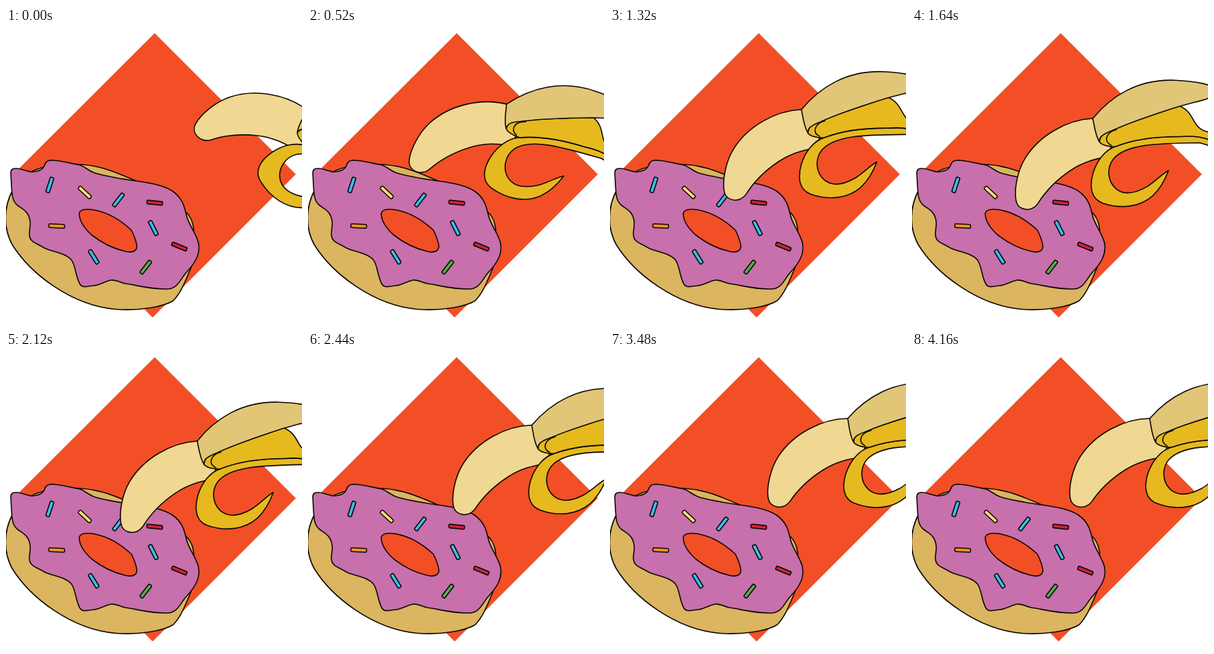
Recreate the animation shown at these times as an HTML page. Size 432 by 432 pixels, loop 4200 ms.

```html
<!DOCTYPE html>
<html lang="en">
<head>
<meta charset="utf-8">
<title>Banana and donut</title>
<style>
  html, body { margin: 0; height: 100%; overflow: hidden; background: #fff; }
  svg { display: block; width: 100%; height: 100%; }
  .ink { stroke: #0b0705; stroke-width: 1.6; stroke-linejoin: round; stroke-linecap: round; }
</style>
</head>
<body>
<svg viewBox="0 0 432 432">
  <path fill="#f24f26" d="M217 7.5 423 213.5 214 422.5 8 216Z"/>

  <g class="ink">
    <path fill="#dbb55f" d="M10 236C-4 262-4 292 9 316C35 358 95 405 160 410.500C195 413 230 407 244 398
      C256 386 262 368 270 350L274 295C273 280 266 271 260 267L187 222C150 206 130 199 100 199
      C85 199 70 200 60 202C35 207 20 218 10 236Z"/>
    <path fill="#c770ac" d="M7 212C7 206 10 205 15 205C24 205 30 210 39 210C46 209 53 208 56 201
      C58 194 62 193 68 193C82 194 97 198 108 200C116 203 120 208 128 211C146 217 168 220 188 223
      C210 226 229 229 243 238C257 248 260 259 263 272C266 287 277 298 281 314C284 330 276 343 263 357
      C254 367 251 381 234 381C208 381 190 375 174 373C167 372 161 367 153 368C143 370 138 375 128 376
      C119 377 112 380 108 374C101 362 102 346 95 338C86 328 68 327 56 321C46 315 36 312 35 306
      C32 298 37 290 35 281C33 268 25 265 17 259C8 252 9 240 8 231Z"/>
    <path fill="#f24f26" d="M107 273C105 264 119 263 131 266C150 270 169 282 183 295C187 303 190 311 191 318
      C191 327 183 328 174 326C156 322 139 313 125 302C115 293 108 284 107 273Z"/>
    <g id="sprinkles"></g>
  </g>

  <g id="banana" class="ink">
    <path fill="#f0d792" d="M238 154C200 157 160 182 141 216C130 236 127 262 130 277C133 293 154 294 162 281
      C173 262 190 244 208 231C226 218 243 213 262 209L270 180Z"/>
    <path fill="#e6b91e" d="M272 194C258 199 246 215 241 234C236 255 240 272 257 277C284 285 311 281 329 264
      C340 253 346 241 351 226C342 231 331 244 320 251C307 259 289 266 275 255C263 245 260 226 270 212
      C287 190 330 187 395 184L414 189V181C398 174 382 174 366 176C330 177 299 182 272 194Z"/>
    <path fill="#e6b91e" d="M249 188C248 179 255 173 268 168L363 131C377 136 381 145 386 153
      C394 167 405 169 420 168L414 181C398 174 382 174 366 176C330 177 299 182 272 194C261 194 253 193 249 188Z"/>
    <path fill="none" d="M266 192C255 187 257 174 273 169"/>
    <path fill="#e0c676" d="M238 154C263 121 301 94 355 94C386 94 416 99 416 107C416 116 401 121 386 125
      L363 132C329 144 294 157 266 171C252 177 248 181 249 188C243 180 241 167 238 154Z"/>
    <path fill="#86620d" d="M422 164C427 168 433 172 433 176C434 185 430 190 424 194L415 192C413 184 417 173 422 164Z"/>
  </g>
</svg>
<script>
const blue = '#3bbdea', red = '#d02238';
// centre x, centre y, angle, colour
const sprinkles = [
  [64, 229, 108, blue], [115, 240, 43, '#f6e070'], [164, 251, 128, blue],
  [217, 255, 6, red], [74, 289, 3, '#f59120'], [215, 292, 63, blue],
  [253, 319, 22, red], [128, 334, 58, blue], [204, 349, 128, '#52b04a']
];
document.getElementById('sprinkles').innerHTML = sprinkles.map(([x, y, angle, fill]) =>
  `<rect x="-11.5" y="-2.7" width="23" height="5.4" rx="1.6" fill="${fill}"
    transform="translate(${x} ${y}) rotate(${angle})"/>`).join('');

const LOOP = 4200;
const PIVOT = [238, 154];
// time, pivot x, pivot y, rotation
const keys = [
  [0, 440, 120, 42],
  [250, 368, 58, 30],
  [520, 290, 111, 19],
  [1040, 238, 154, 0],
  [1380, 283, 116, 2.5],
  [1640, 264, 132, 2],
  [1860, 242, 149, 0.7],
  [2120, 279, 130, 1.6],
  [2700, 347, 97, 4],
  [LOOP, 347, 97, 4]
];

// Slope at a key: zero at turning points, otherwise the harmonic mean of both sides.
function slope(i, c) {
  const rate = j => (keys[j + 1][c] - keys[j][c]) / (keys[j + 1][0] - keys[j][0]);
  if (i === 0) return rate(0);
  if (i === keys.length - 1) return 0;
  const a = rate(i - 1), b = rate(i);
  return a * b > 0 ? 2 * a * b / (a + b) : 0;
}

function valueAt(t, c) {
  const i = keys.findIndex((key, n) => n + 1 < keys.length && t < keys[n + 1][0]);
  const [p, q] = [keys[i], keys[i + 1]];
  const span = q[0] - p[0], u = (t - p[0]) / span, v = 1 - u;
  return v * v * ((1 + 2 * u) * p[c] + u * span * slope(i, c)) +
         u * u * ((1 + 2 * v) * q[c] - v * span * slope(i + 1, c));
}

const banana = document.getElementById('banana');
function draw() {
  const t = performance.now() % LOOP;
  const [x, y, angle] = [1, 2, 3].map(c => valueAt(t, c));
  banana.setAttribute('transform',
    `translate(${x} ${y}) rotate(${angle}) translate(${-PIVOT[0]} ${-PIVOT[1]})`);
  requestAnimationFrame(draw);
}
draw();
</script>
</body>
</html>
```
